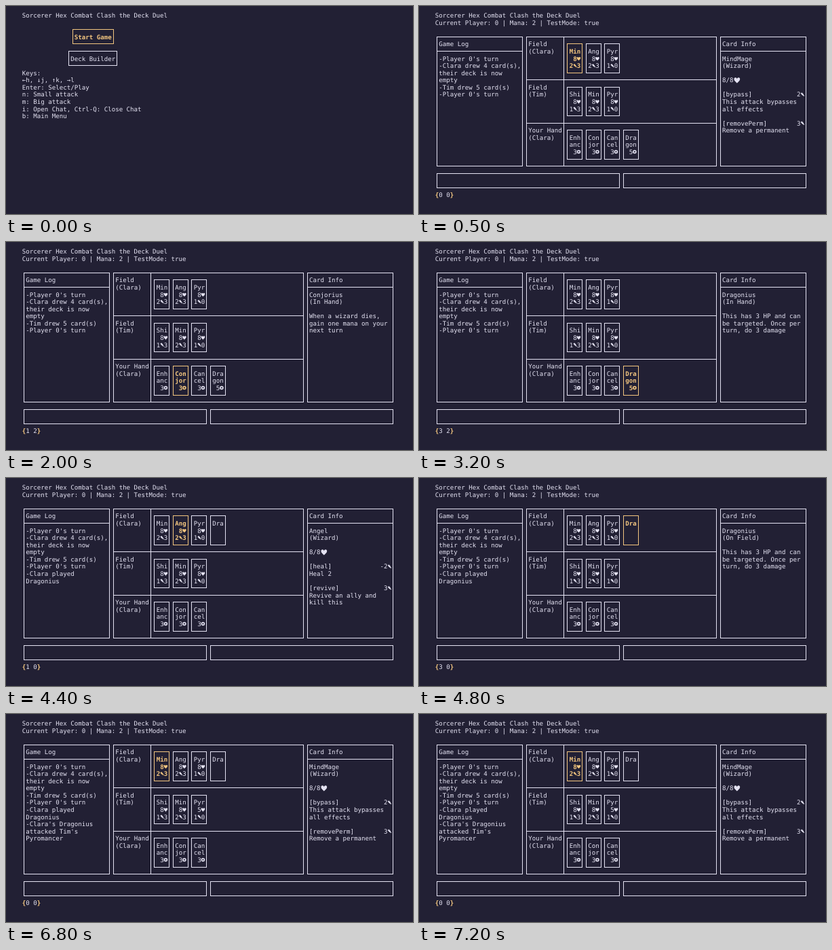
An HTML page that plays this animation: 600x306 px, repeating every 7.4 s.

```html
<!DOCTYPE html>
<html lang="en">
<head>
<meta charset="utf-8">
<title>Card duel in a terminal</title>
<style>
  html, body { margin: 0; width: 100%; height: 100%; overflow: hidden; background: #222034; }
  svg { display: block; width: 600px; height: 306px; }
  text {
    font: 9.13px "DejaVu Sans Mono", monospace;
    white-space: pre;
    text-rendering: geometricPrecision;
  }
  .bold { font-weight: bold; }
</style>
</head>
<body>
<svg id="stage" viewBox="0 0 600 306"></svg>
<script>
const LOOP = 7400;
const INK = '#e4e2f2', GOLD = '#f2c57f', BACK = '#222034';
const TITLE = 'Sorcerer Hex Combat Clash the Deck Duel';
const ONE = 'Clara', TWO = 'Tim';

// Terminal grid
const CW = 5.497, RH = 10.57;
const left = c => 23.8 + c * CW;
const midX = c => left(c + 0.5);
const midY = r => 13.6 + r * RH;
const snap = v => Math.floor(v) + 0.5;

const HEART = 'M0 1C-.5 .5-1 .2-1-.35C-1-1-.25-1.1 0-.5C.25-1.1 1-1 1-.35C1 .2 .5 .5 0 1Z';
const STAR = Array.from({ length: 10 }, (_, i) => {
  const a = i * Math.PI / 5 - Math.PI / 2, d = i % 2 ? 0.7 : 1.7;
  return (d * Math.cos(a)).toFixed(2) + ',' + (d * Math.sin(a)).toFixed(2);
}).join(' ');
const heart = (s, dx) => color =>
  `<path d="${HEART}" fill="${color}" transform="translate(${dx} .4) scale(${s})"/>`;
const icons = {
  '♥': heart(2.8, 0),
  '♡': heart(4.4, 2.5),
  '✎': color => `<path d="M-1.7-1.9L1.1 1.1" stroke="${color}" stroke-width="2.2"/>` +
    `<path d="M.8 .8L2.5 2.6" stroke="${color}" stroke-width="1.2"/>`,
  '✪': color => `<circle r="2.8" fill="${color}"/><polygon points="${STAR}" fill="${BACK}"/>`
};

function put(c, r, str, color = INK, bold = false) {
  let out = '';
  const plain = [...str].map((ch, i) => {
    if (!icons[ch]) return ch;
    out += `<g transform="translate(${midX(c + i)} ${midY(r)})">${icons[ch](color)}</g>`;
    return ' ';
  }).join('');
  return out + `<text x="${left(c)}" y="${midY(r) + 3.5}" fill="${color}"` +
    `${bold ? ' class="bold"' : ''}>${plain}</text>`;
}

const lines = (c, r, list, color, bold) =>
  list.map((s, i) => put(c, r + i, s, color, bold)).join('');

function rule(c1, r1, c2, r2) {
  return `<path d="M${snap(midX(c1))} ${snap(midY(r1))}L${snap(midX(c2))} ${snap(midY(r2))}" stroke="${INK}"/>`;
}

function box(c1, r1, c2, r2, color = INK) {
  const x = snap(midX(c1)), y = snap(midY(r1));
  return `<rect x="${x}" y="${y}" width="${snap(midX(c2)) - x}" height="${snap(midY(r2)) - y}" fill="none" stroke="${color}"/>`;
}

// Card data
const skill = (name, cost) => name + cost.padStart(21 - name.length) + '✎';
const wizard = (name, hp, ...rest) => [name, '(Wizard)', '', hp + '/8♡', '', ...rest];
const spell = (name, ...rest) => [name, '(In Hand)', '', ...rest];

const mind = {
  face: ['Min', ' 8♥', '2✎3'],
  info: wizard('MindMage', 8, skill('[bypass]', '2'), 'This attack bypasses', 'all effects', '',
    skill('[removePerm]', '3'), 'Remove a permanent')
};
const angel = {
  face: ['Ang', ' 8♥', '2✎3'],
  info: wizard('Angel', 8, skill('[heal]', '-2'), 'Heal 2', '',
    skill('[revive]', '3'), 'Revive an ally and', 'kill this')
};
const pyro = hp => ({
  face: ['Pyr', ` ${hp}♥`, '1✎0'],
  info: wizard('Pyromancer', hp, skill('[splash]', '1'), "Attack target wizard's", 'allies', '',
    skill('[megaSplash]', '0'), 'Attack all opposing', 'wizards for 1 damage')
});
const shield = {
  face: ['Shi', ' 8♥', '1✎3'],
  info: wizard('ShieldMage', 8, skill('[block]', '1'), 'Block the next attack', '',
    skill('[guard]', '3'), 'Protect an ally')
};
const dragonText = ['This has 3 HP and can', 'be targeted. Once per', 'turn, do 3 damage'];
const dragonHand = { face: ['Dra', 'gon', ' 5✪'], info: spell('Dragonius', ...dragonText) };
const dragonField = { face: ['Dra'], info: ['Dragonius', '(On Field)', '', ...dragonText] };
const hand = [
  { face: ['Enh', 'anc', ' 3✪'], info: spell('Enhancius', "Your wizards' attacks", 'do one more damage') },
  { face: ['Con', 'jor', ' 3✪'], info: spell('Conjorius', 'When a wizard dies,', 'gain one mana on your', 'next turn') },
  { face: ['Can', 'cel', ' 3✪'], info: spell('Cancelius', 'Cancel the next spell', 'of your opponent') }
];

const log = [
  ["-Player 0's turn", `-${ONE} drew 4 card(s),`, 'their deck is now', 'empty',
    `-${TWO} drew 5 card(s)`, "-Player 0's turn"],
  [`-${ONE} played`, 'Dragonius'],
  [`-${ONE}'s Dragonius`, `attacked ${TWO}'s`, 'Pyromancer']
];

function menu() {
  return put(0, 0, TITLE) +
    box(13, 2, 24, 4, GOLD) + put(14, 3, 'Start Game', GOLD, true) +
    box(12, 5, 25, 7) + put(13, 6, 'Deck Builder') +
    lines(0, 8, ['Keys:', '←h, ↓j, ↑k, →l', 'Enter: Select/Play', 'n: Small attack',
      'm: Big attack', 'i: Open Chat, Ctrl-Q: Close Chat', 'b: Main Menu']);
}

// phase: 0 = opening, 1 = dragon played, 2 = attack done
function game(cx, cy, phase) {
  const rows = [
    [mind, angel, pyro(8), ...(phase ? [dragonField] : [])],
    [shield, mind, pyro(phase === 2 ? 5 : 8)],
    [...hand, ...(phase ? [] : [dragonHand])]
  ];
  const labels = [['Field', `(${ONE})`], ['Field', `(${TWO})`], ['Your Hand', `(${ONE})`]];

  let out = lines(0, 0, [TITLE, 'Current Player: 0 | Mana: 2 | TestMode: true']);
  out += box(0, 3, 23, 21) + rule(0, 5, 23, 5) + put(1, 4, 'Game Log');
  out += lines(1, 6, log.slice(0, phase + 1).flat());
  out += box(24, 3, 75, 21) + rule(34, 3, 34, 21) + rule(24, 9, 75, 9) + rule(24, 15, 75, 15);
  out += box(76, 3, 99, 21) + rule(76, 5, 99, 5) + put(77, 4, 'Card Info');
  out += lines(77, 6, rows[cy][cx].info);

  rows.forEach((cards, y) => {
    const top = 4 + y * 6;
    out += lines(25, top, labels[y]);
    cards.forEach((card, x) => {
      const on = x === cx && y === cy, color = on ? GOLD : INK, c = 35 + x * 5;
      out += box(c, top, c + 4, top + 4, color) + lines(c + 1, top + 1, card.face, color, on);
    });
  });

  out += box(0, 22, 49, 24) + box(50, 22, 99, 24);
  return out + put(0, 25, '{', GOLD, true) + put(1, 25, `${cx} ${cy}`) + put(4, 25, '}', GOLD, true);
}

// [start ms, cursor x, cursor y, phase]
const steps = [
  [0], [500, 0, 0, 0],
  [1400, 0, 1, 0], [1500, 0, 2, 0],
  [2000, 1, 2, 0], [2100, 2, 2, 0], [2200, 3, 2, 0],
  [3700, 2, 2, 1], [4000, 0, 0, 1],
  [4400, 1, 0, 1], [4500, 2, 0, 1], [4600, 3, 0, 1],
  [5500, 2, 0, 1], [6100, 2, 1, 1],
  [6800, 0, 0, 2]
];

const stage = document.getElementById('stage');
let shown = -1;

function draw(now) {
  const t = now % LOOP;
  const i = steps.findLastIndex(s => s[0] <= t);
  if (i !== shown) {
    shown = i;
    stage.innerHTML = i ? game(...steps[i].slice(1)) : menu();
  }
}

const start = performance.now();
function tick() {
  draw(performance.now() - start);
  requestAnimationFrame(tick);
}
tick();
</script>
</body>
</html>
```
